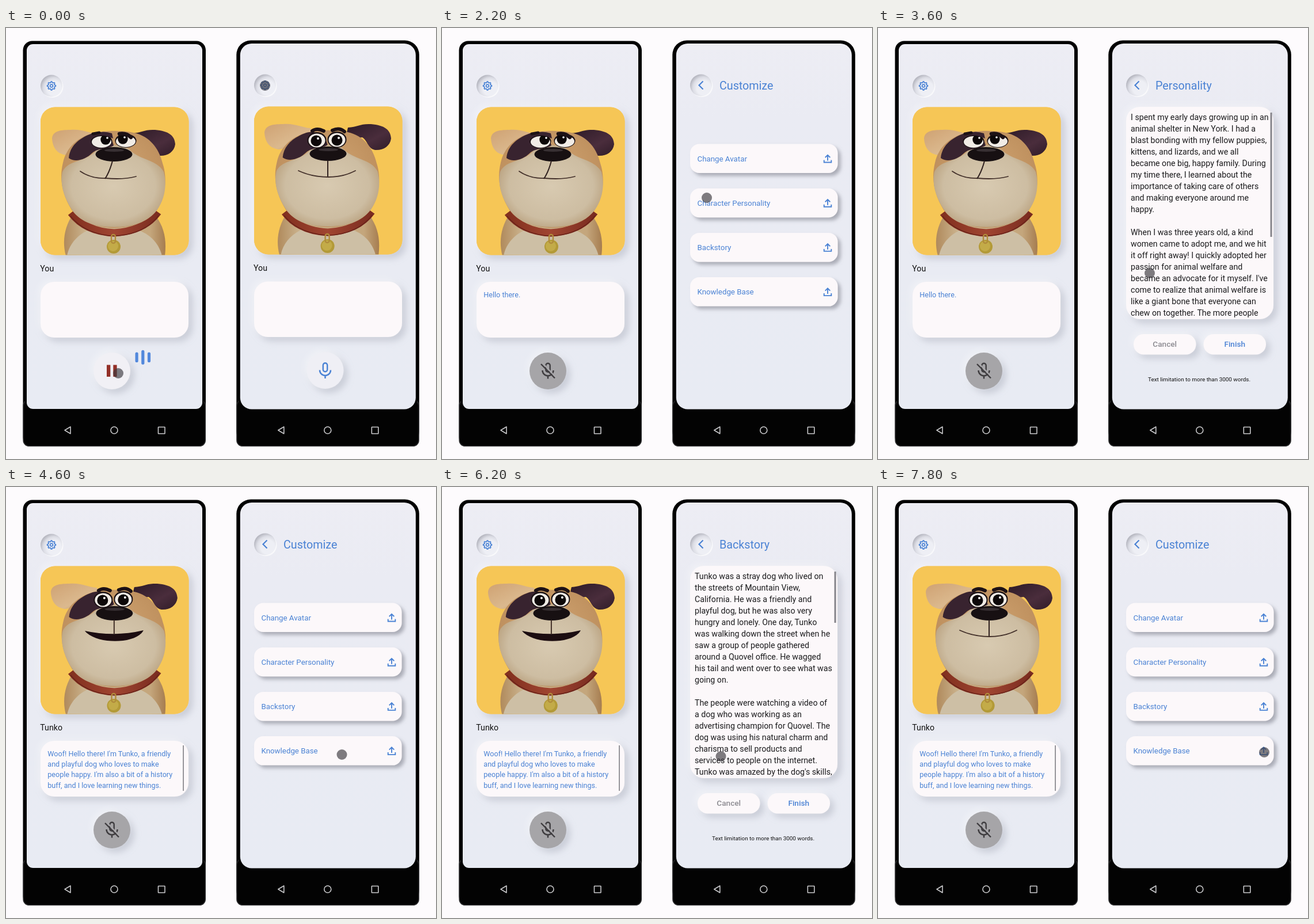
Write an HTML page that moves like this. It is 747 by 749 pixels and loops after 8 s.

```html
<!DOCTYPE html>
<html lang="en">
<head>
<meta charset="utf-8">
<title>Talking avatar</title>
<style>
html, body { margin: 0; width: 100%; height: 100%; overflow: hidden; background: #fdfbfd; }
svg { display: block; width: 100%; height: 100%; font-family: Roboto, sans-serif; }
text { white-space: pre; }
</style>
</head>
<body>
<svg viewBox="0 0 747 749">
  <defs>
    <linearGradient id="screen" x1="0" y1="0" x2="0" y2="1">
      <stop offset="0" stop-color="#ededf4"/><stop offset=".2" stop-color="#eaebf3"/><stop offset="1" stop-color="#e8ebf3"/>
    </linearGradient>
    <radialGradient id="dent" cx=".63" cy=".63" r=".64">
      <stop offset=".5" stop-color="#eeeff5"/><stop offset=".78" stop-color="#dcdde5"/><stop offset="1" stop-color="#b9bac3"/>
    </radialGradient>
    <radialGradient id="cream" cx=".5" cy=".5" r=".58">
      <stop offset="0" stop-color="#d8cab1"/><stop offset=".7" stop-color="#cdbd a2"/><stop offset="1" stop-color="#b59b77"/>
    </radialGradient>
    <radialGradient id="tan" cx=".5" cy=".4" r=".65">
      <stop offset="0" stop-color="#d0a472"/><stop offset="1" stop-color="#b98a58"/>
    </radialGradient>
    <linearGradient id="flank">
      <stop offset="0" stop-color="#b08a5c"/><stop offset=".2" stop-color="#c9b08a"/><stop offset=".85" stop-color="#c4a67c"/><stop offset="1" stop-color="#a67d50"/>
    </linearGradient>
    <linearGradient id="ear" x1="0" y1="0" x2="1" y2="1">
      <stop offset="0" stop-color="#cfa273"/><stop offset=".6" stop-color="#dbb98e"/><stop offset="1" stop-color="#b38a5e"/>
    </linearGradient>
    <linearGradient id="darkEar" x1="0" y1="0" x2="1" y2="1">
      <stop offset="0" stop-color="#2c1a26"/><stop offset=".6" stop-color="#4a2d3c"/><stop offset="1" stop-color="#301c28"/>
    </linearGradient>
    <linearGradient id="collar"><stop offset="0" stop-color="#82301f"/><stop offset=".5" stop-color="#a04531"/><stop offset="1" stop-color="#7a2c20"/></linearGradient>
    <filter id="soft" x="-30%" y="-30%" width="170%" height="180%">
      <feDropShadow dx="-4" dy="-4" stdDeviation="5" flood-color="#fff" flood-opacity=".35"/>
      <feDropShadow dx="7" dy="7" stdDeviation="6" flood-color="#9a9dab" flood-opacity=".38"/>
    </filter>
    <filter id="raised" x="-10%" y="-30%" width="125%" height="190%">
      <feDropShadow dx="5" dy="5" stdDeviation="3" flood-color="#80828e" flood-opacity=".6"/>
    </filter>
    <clipPath id="photo"><rect x="60" y="137.5" width="257.5" height="257" rx="25"/></clipPath>
    <clipPath id="panel"><rect x="431" y="137" width="256" height="368" rx="24"/></clipPath>
  </defs>
  <g id="phones"></g>
  <g id="left"></g>
  <g id="right"></g>
</svg>
<script>
const LOOP = 8000, STEP = 200;
const BLUE = '#4a82d4', PAPER = '#fcf8fa';
const $ = id => document.getElementById(id);

const text = (x, y, s, size, fill = '#111', extra = '') =>
  `<text x="${x}" y="${y}" font-size="${size}" fill="${fill}" ${extra}>${s}</text>`;
const lines = (x, y, gap, rows, size, fill) =>
  rows.map((s, i) => text(x, y + i * gap, s, size, fill)).join('');
const box = (x, y, w, h, r, fill, extra = '') =>
  `<rect x="${x}" y="${y}" width="${w}" height="${h}" rx="${r}" fill="${fill}" ${extra}/>`;
const disc = (x, y, r, fill, extra = '') =>
  `<circle cx="${x}" cy="${y}" r="${r}" fill="${fill}" ${extra}/>`;
const oval = (x, y, rx, ry, fill) =>
  `<ellipse cx="${x}" cy="${y}" rx="${rx}" ry="${ry}" fill="${fill}"/>`;
const shape = (d, fill) => `<path d="${d}" fill="${fill}"/>`;
const line = (d, color, w, extra = '') =>
  `<path d="${d}" fill="none" stroke="${color}" stroke-width="${w}" ${extra}/>`;
const at = (x, y, s) => `<g transform="translate(${x} ${y})">${s}</g>`;
const cursor = (x, y) => disc(x, y, 9, '#3c3a40', 'opacity=".66"');

// Linear interpolation through rows of [time, ...values]
function track(keys, t) {
  const i = keys.findIndex(k => k[0] > t);
  if (i < 0) return keys[keys.length - 1].slice(1);
  const a = keys[i - 1], b = keys[i], p = (t - a[0]) / (b[0] - a[0]);
  return a.slice(1).map((v, n) => v + (b[n + 1] - v) * p);
}

function phone(x, y, r) {
  const nav = 'stroke="#c9c9cb" stroke-width="1.6"';
  return box(x, y, 317.5, 704.5, r, '#000') +
    box(x + .7, 646, 316, 80.5, 10, '#030303', 'stroke="#252527" stroke-width="1.6"') +
    box(x + 4, 630, 309.5, 90, 10, '#030303') +
    box(x + 6.5, y + 5.5, 305, y < 22 ? 635.5 : 634, r - 5, 'url(#screen)') +
    line(`M${x + 82.5} 693V705L${x + 72.5} 699Z`, '#c9c9cb', 1.6, 'stroke-linejoin="round"') +
    disc(x + 158.5, 699, 6, 'none', nav) +
    box(x + 235, 693.5, 11.5, 11.5, .5, 'none', nav);
}

function gear() {
  const pts = [];
  for (let i = 0; i < 32; i++) {
    const a = (i - 1.5) / 32 * 2 * Math.PI, r = i % 4 === 1 || i % 4 === 2 ? 7.4 : 5.6;
    pts.push((r * Math.sin(a)).toFixed(2) + ' ' + (-r * Math.cos(a)).toFixed(2));
  }
  return line(`M${pts.join('L')}Z`, BLUE, 1.7, 'stroke-linejoin="round"') +
    disc(0, 0, 2.4, 'none', `stroke="${BLUE}" stroke-width="1.6"`);
}
const chevron = line('M3.5 -7L-3.5 0L3.5 7', BLUE, 2.2);
const dent = (x, y, icon) => at(x, y,
  disc(1.5, 1.5, 19, '#fff', 'opacity=".7"') + disc(0, 0, 19, 'url(#dent)') + icon);

function mic(x, y, color, off) {
  const body = box(-3.7, -13.3, 7.4, 15, 3.7, 'none', `stroke="${color}" stroke-width="2.4"`) +
    line('M-9.5 -1a9.5 9.5 0 0 0 19 0M0 8.5V13.5', color, 2.5);
  const slash = line('M-10 -14.5L13.5 10.5', '#a9a8ab', 2.4) + line('M-12 -12L12 12.5', color, 2.5);
  return at(x, y, body + (off ? slash : ''));
}

// Coordinates are those of the left phone's picture
function dog(front, open, dx) {
  const ink = '#1d1216', patch = '#38232f', round = 'stroke-linecap="round"';
  const lift = front ? -9 : 0, spread = front ? 3 : 0;
  const eye = (x, y, px, py) => front
    ? oval(x, y, 16.5, 14, '#191013') + oval(x, y + .5, 14.5, 12, '#f1ece6') + disc(px, py, 9.5, '#0d0809') + disc(px + 3, py - 4, 2, '#fff')
    : oval(x, y, 18.5, 12, '#191013') + oval(x, y + 1, 17, 10, '#f1ece6') + disc(px, py, 8.7, '#0d0809') + disc(px + 3, py - 3, 1.8, '#fff');
  const body =
    shape('M116 324C102 345 97 370 104 396H276C279 370 276 348 260 326Z', 'url(#flank)') +
    shape('M106 396C110 374 126 358 146 350H226C252 358 266 376 271 396Z', '#cdbfa5') +
    line('M113 321Q138 354 188 356Q240 353 264 320', 'url(#collar)', 13) +
    line('M112 327Q138 359 188 361.5Q240 359 265 326', '#6a2219', 1.5);
  const tag = disc(187, 380, 12, '#b39a37') + disc(186, 379, 9, '#c3ab48') +
    box(183, 359, 7, 15, 3.5, 'none', 'stroke="#b08b3b" stroke-width="2.4"');
  const ears =
    at(-spread, lift, shape('M168 204L160 184C143 183 133 175 112 177C92 177 81 180 80 192C81 207 88 219 105 221C122 219 127 207 138 197Z', 'url(#ear)')) +
    at(spread, lift, shape('M214 204L219 183C236 182 240 176 259 177C283 179 293 187 294 202C292 216 280 223 266 222C253 219 254 207 244 200Z', 'url(#darkEar)'));
  const head =
    shape('M150 183C125 190 105 207 99 234C92 262 98 290 114 316C130 338 160 347 188 347C222 347 250 335 263 315C278 290 280 258 272 235C266 210 250 188 222 182C200 177 170 178 150 183Z', 'url(#tan)') +
    shape('M98 250C108 228 140 234 158 211C172 201 202 201 214 211C232 230 262 228 274 250C280 272 276 298 262 317C245 338 220 346 188 346C150 346 127 335 114 315C98 290 94 268 98 250Z', 'url(#cream)') +
    shape('M109 226C111 206 125 192 150 183C168 178 184 188 187 204C178 211 160 208 150 217C138 229 120 234 109 226Z', patch);
  const eyes = front
    ? eye(168, 196, 167, 197) + eye(203, 195, 203, 196) +
      line('M160 180Q168 174 180 180', ink, 6, round) +
      line('M195 179Q207 173 216 181', ink, 6, round)
    : eye(166, 197, 173, 194) + eye(208, 196, 203, 193) +
      shape('M146 195Q160 180 186 192L184 183Q164 176 146 188Z', patch) +
      line('M151 184L162 182', ink, 5, round) +
      line('M197 184Q209 182 217 190', ink, 6.5, round);
  const nose = oval(187.5, 219.5, 32, 12.5, '#171012') + oval(188, 212.5, 17, 2.5, '#383033');
  let mouth;
  if (open > .05) {
    const low = 256 + 21 * open;
    mouth = shape(`M136 250Q188 261 238 249C226 ${low} 156 ${low + 1} 136 250Z`, '#1c0d11') + line('M187 231V255', '#443129', 2);
  } else if (front) {
    mouth = line('M136 249Q160 260 188 260Q214 260 235 249', '#43302a', 1.8, round) +
      line('M187 231V259', '#30211f', 2);
  } else {
    mouth = line('M129 249Q148 262 173 261Q204 264 226 258', '#43302a', 1.8, round) +
      line('M185 231Q180 250 172 262', '#30211f', 2);
  }
  return `<g clip-path="url(#photo)">${box(60, 137, 258, 258, 0, '#f6c656')}` +
    at(dx * .2, 0, body) + at(dx * .6, 0, tag) + at(dx, 0, ears) +
    at(dx * .6, 0, head) + at(dx, 0, eyes + nose + mouth) + '</g>';
}

const photoCard = (x, y, inner) =>
  at(x, y, box(60, 137.5, 257.5, 257, 25, '#f6c656', 'filter="url(#soft)"') + inner);
const paper = (x, y, w, h, r, filter = 'soft') => box(x, y, w, h, r, PAPER, `filter="url(#${filter})"`);

const reply = [
  "Woof! Hello there! I'm Tunko, a friendly",
  'and playful dog who loves to make',
  "people happy. I'm also a bit of a history",
  'buff, and I love learning new things.'];
const stories = {
  Personality: { bar: 216, rows: [
    'I spent my early days growing up in an', 'animal shelter in New York. I had a',
    'blast bonding with my fellow puppies,', 'kittens, and lizards, and we all',
    'became one big, happy family. During', 'my time there, I learned about the',
    'importance of taking care of others', 'and making everyone around me',
    'happy.', '', 'When I was three years old, a kind',
    'women came to adopt me, and we hit', 'it off right away! I quickly adopted her',
    'passion for animal welfare and', "became an advocate for it myself. I've",
    'come to realize that animal welfare is', 'like a giant bone that everyone can',
    'chew on together. The more people'] },
  Backstory: { bar: 89, rows: [
    'Tunko was a stray dog who lived on', 'the streets of Mountain View,',
    'California. He was a friendly and', 'playful dog, but he was also very',
    'hungry and lonely. One day, Tunko', 'was walking down the street when he',
    'saw a group of people gathered', 'around a Quovel office. He wagged',
    'his tail and went over to see what was', 'going on.', '',
    'The people were watching a video of', 'a dog who was working as an',
    'advertising champion for Quovel. The', 'dog was using his natural charm and',
    'charisma to sell products and', 'services to people on the internet.',
    "Tunko was amazed by the dog's skills,"] }
};

const heading = s => dent(450, 99.5, chevron) + text(482, 106.5, s, 19.7, BLUE);

function homePage() {
  return dent(450, 99.5, gear()) + photoCard(371, -1, dog(true, 0, 1)) +
    text(430, 422, 'You', 14.2) + paper(431, 440.5, 257, 96.5, 24) +
    disc(554.5, 595, 32, '#efeff5', 'filter="url(#soft)"') + mic(554.5, 595.5, BLUE);
}
function listPage() {
  const items = ['Change Avatar', 'Character Personality', 'Backstory', 'Knowledge Base'];
  return heading('Customize') + items.map((s, i) => {
    const y = 201.5 + i * 77.2;
    return paper(431, y, 256.5, 50.5, 16, 'raised') + text(443.5, y + 30, s, 13.3, BLUE) +
      at(670, y + 25.5, line('M-6.3 2.5V6.5H6.3V2.5M0 3.5V-5.5M-4.3 -2L0 -6.2L4.3 -2', BLUE, 1.9));
  }).join('');
}
function storyPage(name) {
  const { rows, bar } = stories[name];
  const button = (x, s, color) => paper(x, 532, 108.5, 35.5, 17.5) +
    text(x + 54.2, 554.2, s, 13.6, color, 'font-weight="500" text-anchor="middle"');
  return heading(name) + paper(431, 137, 256, 369, 24) +
    `<g clip-path="url(#panel)">${lines(439, 160.3, 20, rows, 14.2, '#1b1b1d')}</g>` +
    box(681.5, 147, 3, bar, 0, '#85848a') +
    button(444, 'Cancel', '#8c8b91') + button(565.5, 'Finish', BLUE) +
    text(469, 613.5, 'Text limitation to more than 3000 words.', 9.92);
}
function rightPage(t) {
  if (t < 400) return homePage();
  if (t >= 3000 && t < 4400) return storyPage('Personality');
  if (t >= 5000 && t < 6600) return storyPage('Backstory');
  return listPage();
}

const sway = [[0, 0], [800, 2], [2200, 5], [3600, 0], [5400, 1.5], [6800, 4], [7800, 6]];
const pointer = [[0, 450, 100], [1200, 450, 100], [2200, 460, 295], [2800, 670, 304], [3000, 670, 304],
  [3600, 472, 426], [3800, 472, 426], [4200, 497, 549], [4400, 497, 549], [4800, 670, 381],
  [5000, 670, 381], [5400, 470, 385], [6000, 470, 385], [6400, 499, 551], [6800, 500, 555],
  [7000, 500, 555], [7600, 671, 461]];

function leftButton(t) {
  if (t < 400) {
    const bars = [8.8, 12.5, 8.8].map((h, i) => {
      const k = h * (.85 + .15 * Math.cos(t / 90));
      return box(224.5 + i * 10.7, 572.3 - k, 5.2, 2 * k, 2.6, '#5288dc');
    }).join('');
    return disc(184, 596, 32, '#f1f0f5', 'filter="url(#soft)"') +
      box(175, 585.5, 6.3, 20.5, 0, '#932f27') + box(186.3, 585.5, 6.3, 20.5, 0, '#932f27') +
      bars + cursor(195, 600);
  }
  const early = t < 1400;
  return disc(184, 596, 32, early ? '#bcbbbe' : '#a6a5a8', 'filter="url(#soft)"') +
    mic(184, 596, '#3f3d40', true) + (early ? cursor(195, 600) : '');
}

function draw(t) {
  const talk = t >= 4200;
  const open = talk && t < 7600 ? .55 + .45 * Math.cos((t - 5400) / 700 * 2 * Math.PI) : 0;
  const speech = talk
    ? lines(72.3, 467.8, 18.3, reply, 12.6, BLUE) + box(307.2, 449, 1.8, 79, 0, '#8b8a90')
    : t >= 1400 ? text(72.3, 467.8, 'Hello there.', 12.6, BLUE) : '';
  $('left').innerHTML = dent(79, 100.5, gear()) +
    photoCard(0, 0, dog(talk, open, track(sway, t)[0])) +
    text(59.3, 423, talk ? 'Tunko' : 'You', 14.2) +
    paper(60, 441, 257, 97, 24) + speech + leftButton(t);
  $('right').innerHTML = rightPage(t) + cursor(...track(pointer, t));
}

$('cream').children[1].setAttribute('stop-color', '#cdbda2');
$('phones').innerHTML = phone(29.5, 22.5, 16) + phone(400.3, 21.5, 25);

const start = performance.now();
let shown = -1;
function tick(now) {
  const step = Math.floor(Math.max(0, now - start) % LOOP / STEP);
  if (step !== shown) draw((shown = step) * STEP);
  requestAnimationFrame(tick);
}
tick(start);
</script>
</body>
</html>
```
